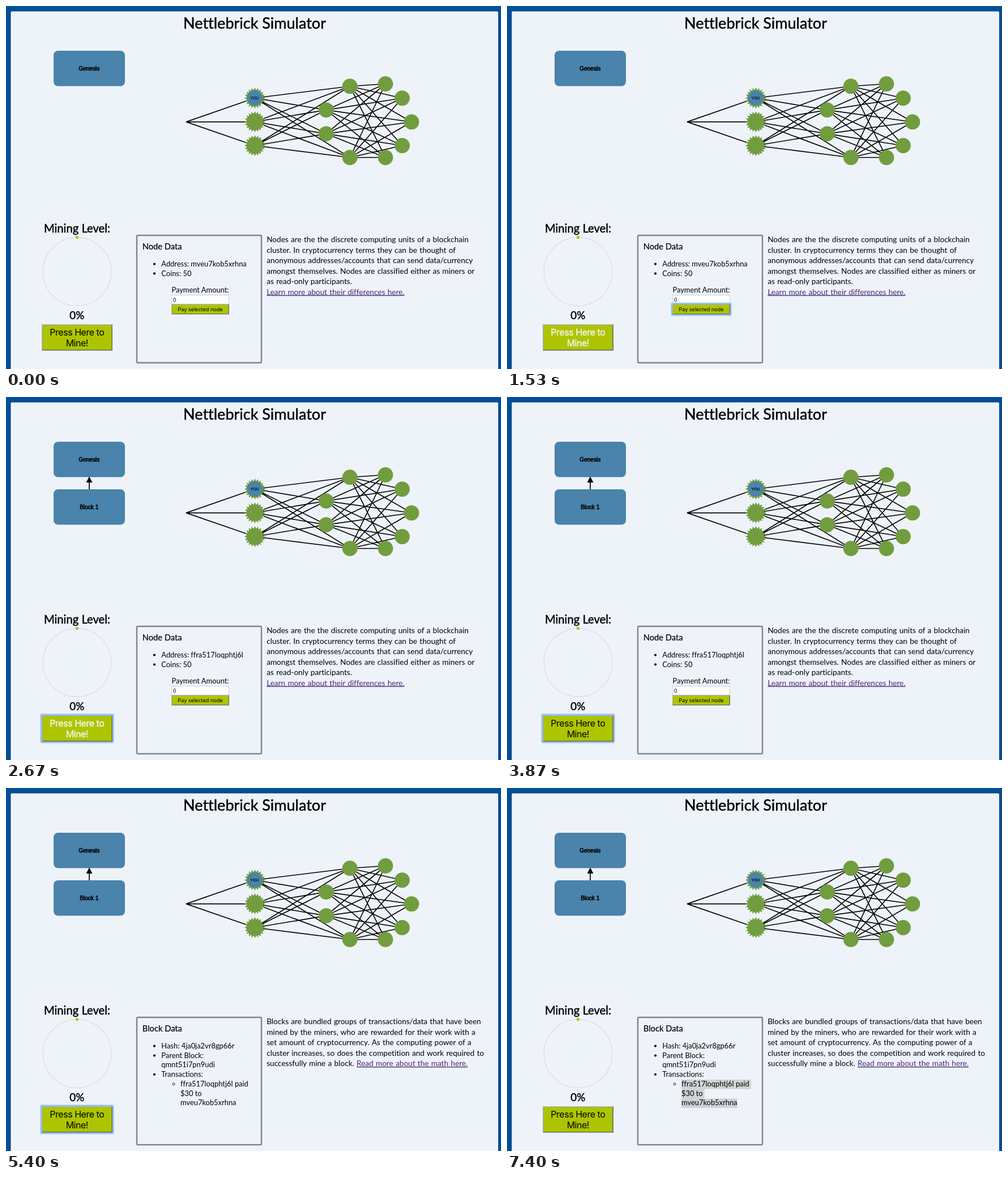
An HTML page that plays this animation: 874 px wide and 641 px high, repeating every 7470 ms.

```html
<!DOCTYPE html>
<html lang="en">
<head>
<meta charset="utf-8">
<title>Nettlebrick Simulator</title>
<style>
  html, body { margin: 0; width: 100%; height: 100%; overflow: hidden; background: #04509a; }
  svg { display: block; width: 874px; height: 641px; }
  text { font-family: Lato, "Open Sans", sans-serif; font-variant-ligatures: none; fill: #000; white-space: pre; }
  .prose { font-size: 13.6px; word-spacing: .06em; }
  .item { font-size: 12.9px; }
  .head { font-size: 14.7px; stroke: #000; stroke-width: .2; }
  .big { stroke: #000; stroke-width: .45; }
  .label { font: 10.08px "Liberation Sans", Arial, sans-serif; stroke: #000; stroke-width: .6; }
  .you { font: 6.9px "Liberation Sans", Arial, sans-serif; stroke: #000; stroke-width: .15; }
  .ui { font: 9.1px Inter, Roboto, sans-serif; }
  .mine { font: 16px Inter, Roboto, sans-serif; letter-spacing: -.03em; }
  .hover .mine { fill: #f1f4ea; stroke: #f1f4ea; stroke-width: .4; }
  .link { fill: #4b2a72; text-decoration: underline; }
  .mid { text-anchor: middle; }
</style>
</head>
<body>
<svg id="stage" viewBox="0 0 874 641"></svg>
<script>
const NS = "http://www.w3.org/2000/svg";
const stage = document.getElementById("stage");
const LOOP = 7470;
const GREEN = "#719d3e", BLUE = "#4a83ab", LIME = "#adc500", PANEL = "#eef3fa";
const MINER_A = "mveu7kob5xrhna", MINER_B = "ffra517loqphtj6l";

function add(parent, tag, attrs = {}, content) {
  const el = document.createElementNS(NS, tag);
  for (const key in attrs) el.setAttribute(key, attrs[key]);
  if (content !== undefined) el.textContent = content;
  parent.appendChild(el);
  return el;
}
const group = (parent = stage, attrs) => add(parent, "g", attrs);
const rect = (p, x, y, width, height, fill, more) =>
  add(p, "rect", { x, y, width, height, fill, ...more });
const circle = (p, cx, cy, r, fill, more) => add(p, "circle", { cx, cy, r, fill, ...more });
const text = (p, x, y, cls, str, more) => add(p, "text", { x, y, class: cls, ...more }, str);
const show = (el, on) => el.setAttribute("visibility", on ? "visible" : "hidden");

// Page
const defs = add(stage, "defs");
const blur = add(defs, "filter", { id: "soft", x: "-10%", y: "-10%", width: "120%", height: "120%" });
add(blur, "feGaussianBlur", { stdDeviation: 3 });
rect(stage, 0, 0, 874, 641, "#04509a");
rect(stage, 8, 10, 861, 650, "#003566", { opacity: .5, filter: "url(#soft)" });
rect(stage, 8.4, 9.4, 860.6, 660, PANEL, { rx: 2 });
text(stage, 439, 40, "big mid", "Nettlebrick Simulator", { "font-size": 27 });

// Chain
function block(p, y, name) {
  rect(p, 84, y, 126, 62.5, BLUE, { rx: 8 });
  text(p, 146.8, y + 35.3, "label mid", name);
}
block(stage, 79, "Genesis");
const mined = group();
add(mined, "path", { d: "M147 164V150", stroke: "#000", "stroke-width": 1.7 });
block(mined, 163, "Block 1");
add(mined, "path", { d: "M147 140.5L152.5 151H141.5Z", fill: "#000" });

// Network
const miners = [162.5, 204.5, 246.5].map(y => [439.4, y]);
const relays = [[607.2, 141.7], [565.3, 183.6], [565.3, 225.6], [607.2, 267.5]];
const leaves = [[670, 137.5], [699.5, 162.7], [716, 204.7], [699.5, 246.5], [670, 267.5]];
const wire = (from, to) => from.map(a => to.map(b => `M${a}L${b}`).join("")).join("");
add(stage, "path", {
  d: wire([[318, 204.6]], miners) + wire(miners, relays) + wire(relays, leaves),
  stroke: "#000", "stroke-width": 1.65, fill: "none"
});
function star([cx, cy]) {
  const spikes = 20, pts = [];
  for (let i = 0; i < spikes * 2; i++) {
    const a = i * Math.PI / spikes - Math.PI / 2, r = i % 2 ? 14.2 : 18.5;
    pts.push([cx + r * Math.cos(a), cy + r * Math.sin(a)]);
  }
  add(stage, "polygon", { points: pts.join(" "), fill: GREEN });
}
miners.forEach(star);
[...relays, ...leaves].forEach(([x, y]) => circle(stage, x, y, 13.4, GREEN));
circle(stage, 439.2, 162.5, 13.2, BLUE);
text(stage, 439, 165, "you mid", "YOU");

// Mining meter
text(stage, 125.5, 399.5, "big mid", "Mining Level:", { "font-size": 20.2 });
circle(stage, 125.5, 469, 60.3, "none", { stroke: "#dddfe2", "stroke-width": 1.4 });
circle(stage, 125.4, 408.6, 2.6, "#a8c400");
text(stage, 125.3, 553, "big mid", "0%", { "font-size": 18.8 });

function ring(p, x, y, w, h) {
  const g = group(p);
  rect(g, x - 3, y - 3, w + 6, h + 6, "#bcd8f9", { rx: 3 });
  rect(g, x - 2, y - 2, w + 4, h + 4, "#93c0f5", { rx: 2 });
  return g;
}
function button(p, x, y, w, h, edge) {
  rect(p, x, y, w, h, "#6f7365");
  add(p, "path", {
    d: `M${x} ${y + h}V${y}H${x + w}l${-edge} ${edge}H${x + edge}V${y + h - edge}Z`, fill: "#b4b8a6"
  });
  rect(p, x + edge, y + edge, w - 2 * edge, h - 2 * edge, LIME);
}
const mineBtn = group();
const mineRing = ring(mineBtn, 63, 562, 125, 46.5);
button(mineBtn, 63, 562, 125, 46.5, 1.7);
text(mineBtn, 125.3, 581.5, "mine mid", "Press Here to");
text(mineBtn, 125.3, 600.5, "mine mid", "Mine!");

// Data box
rect(stage, 231, 405, 220, 225, "none", { stroke: "#808489", "stroke-width": 2.4, rx: 2 });
const dot = (p, y) => circle(p, 262, y, 2.1, "#000");
function bullet(p, y, str) {
  dot(p, y - 4.4);
  return text(p, 274.3, y, "item", str);
}
const nodeView = group();
text(nodeView, 240.8, 430, "head", "Node Data");
const address = bullet(nodeView, 460, "");
bullet(nodeView, 476.8, "Coins: 50");
text(nodeView, 343, 506, "item mid", "Payment Amount:");
rect(nodeView, 292.5, 510.5, 101, 16, "#fff", { stroke: "#c9ccd1", "stroke-width": .9 });
text(nodeView, 294.8, 522, "ui", "0");
const payRing = ring(nodeView, 292, 526.5, 102, 18);
button(nodeView, 292, 526.5, 102, 18, 1.4);
text(nodeView, 343, 539, "ui mid", "Pay selected node");

const blockView = group();
text(blockView, 240.8, 430, "head", "Block Data");
bullet(blockView, 460, "Hash: 4ja0ja2vr8gp66r");
bullet(blockView, 476.8, "Parent Block:");
text(blockView, 274.3, 493.4, "item", "qmnt51i7pn9udi");
bullet(blockView, 510.2, "Transactions:");
circle(blockView, 296, 522.8, 2, "none", { stroke: "#000", "stroke-width": .8 });
const marks = [MINER_B + " paid", "$30 to", MINER_A].map((str, i) => {
  const y = 527 + i * 16.7;
  const mark = rect(blockView, 308, y - 12.2, 0, 16.8, "#b0d3fb");
  const line = text(blockView, 308, y, "item", str);
  mark.setAttribute("width", line.getComputedTextLength() + (i < 2 ? 3 : 0));
  return mark;
});

// Explanations
function prose(lines, link, sameLine) {
  const g = group();
  lines.forEach((str, i) => {
    const last = i === lines.length - 1;
    const line = text(g, 460.2, 417 + i * 18.5, "prose", str);
    if (last && sameLine) add(line, "tspan", { class: "link" }, link);
  });
  if (!sameLine) text(g, 460.2, 417 + lines.length * 18.5, "prose link", link);
  return g;
}
const nodeText = prose([
  "Nodes are the the discrete computing units of a blockchain",
  "cluster. In cryptocurrency terms they can be thought of",
  "anonymous addresses/accounts that can send data/currency",
  "amongst themselves. Nodes are classified either as miners or",
  "as read-only participants."
], "Learn more about their differences here.");
const blockText = prose([
  "Blocks are bundled groups of transactions/data that have been",
  "mined by the miners, who are rewarded for their work with a",
  "set amount of cryptocurrency. As the computing power of a",
  "cluster increases, so does the competition and work required to",
  "successfully mine a block. "
], "Read more about the math here.", true);

// Each step overrides part of the state from its time on
const steps = [
  [0, { focus: "", hover: false, mined: false, view: "node", who: MINER_A, marked: 0, active: true }],
  [1000, { focus: "pay" }],
  [1400, { hover: true }],
  [1900, { focus: "mine" }],
  [2400, { mined: true, who: MINER_B }],
  [3200, { hover: false }],
  [4400, { view: "block" }],
  [5800, { focus: "", marked: 1 }],
  [5930, { marked: 2 }],
  [6060, { marked: 3 }],
  [6900, { active: false }]
];

function draw(now) {
  const t = now % LOOP;
  const s = Object.assign({}, ...steps.filter(([at]) => at <= t).map(([, change]) => change));
  const onNode = s.view === "node";
  for (const el of [nodeView, nodeText]) show(el, onNode);
  for (const el of [blockView, blockText]) show(el, !onNode);
  show(mined, s.mined);
  show(mineRing, s.focus === "mine");
  show(payRing, onNode && s.focus === "pay");
  mineBtn.classList.toggle("hover", s.hover);
  address.textContent = "Address: " + s.who;
  marks.forEach((mark, i) => {
    show(mark, !onNode && i < s.marked);
    mark.setAttribute("fill", s.active ? "#b0d3fb" : "#d0d2d5");
  });
}

const start = performance.now();
function tick() {
  draw(performance.now() - start);
  requestAnimationFrame(tick);
}
tick();
</script>
</body>
</html>
```
